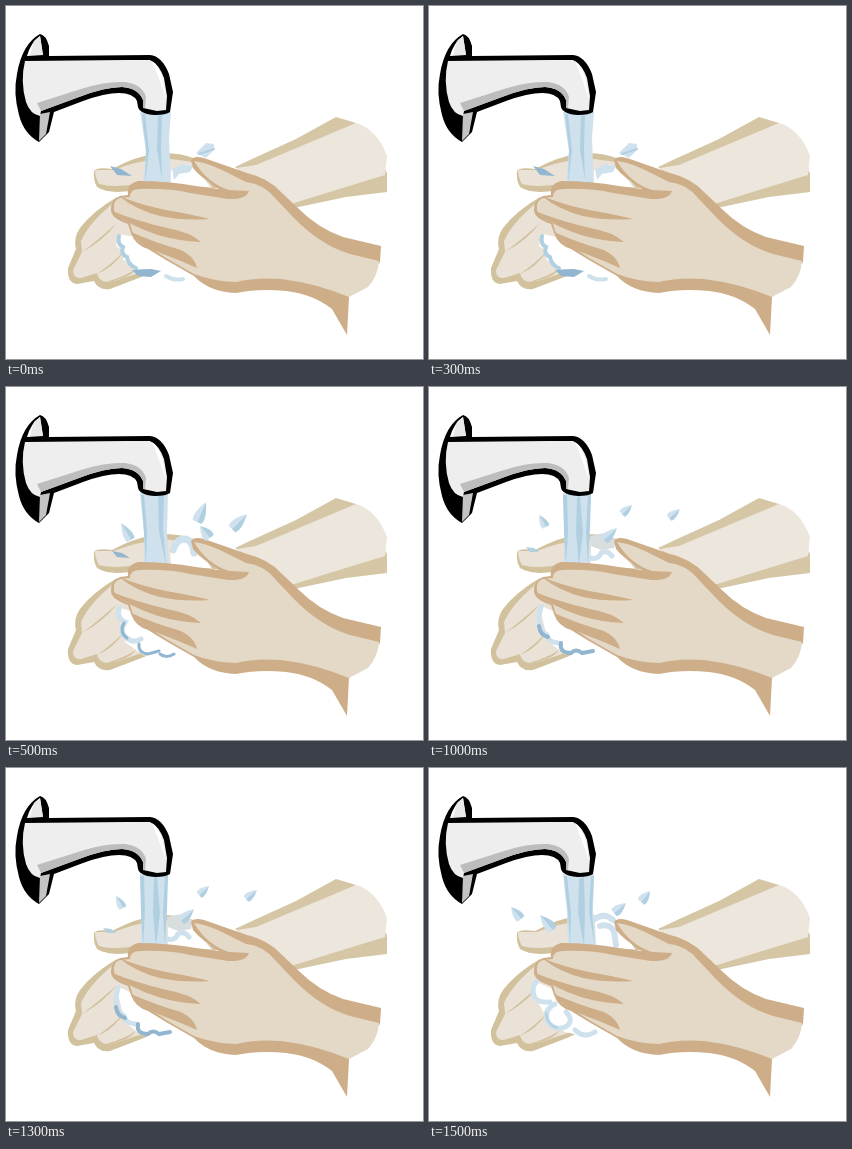
These frames come from a looping animation (417x353 px, 2000 ms). An HTML page:

```html
<!DOCTYPE html>
<html lang="en">
<head>
<meta charset="utf-8">
<title>Washing hands</title>
<style>
html, body { margin: 0; width: 100%; height: 100%; overflow: hidden; background: #fff; }
svg { display: block; width: 100vw; height: 100vh; }
</style>
</head>
<body>
<svg viewBox="0 0 417 353" xmlns="http://www.w3.org/2000/svg">
  <g id="backHand">
    <path fill="#d5c7a5" d="M229 161L246 153L290 133L330 111L350 117L381 167L381 186L340 191L288 202L270 190Z"/>
    <path fill="#ede6dc" d="M231 162L250 159L300 138L350 117Q371 123 381 150L379 169L330 184L285 198L262 181L238 167Z"/>
    <path fill="#d2c19d" d="M88 165Q90 161 106 163Q130 150 153 147Q174 146 190 153L215 182L128 184Q104 189 91 181Q87 174 88 165Z"/>
    <path fill="#ebe2d7" d="M89 164L108 164Q130 155 158 152L187 156L207 182L130 178Q107 182 93 178Q89 171 89 164Z"/>
    <path fill="#d2c19d" d="M111 191Q87 205 74 222Q67 232 70 243L62 262Q61 277 71 278L88 275Q93 285 104 283L138 270L151 264L130 219Z"/>
    <path fill="#ebe2d7" d="M110 195Q84 215 75 235L76 246L67 264Q67 273 75 272L91 267Q92 274 100 276L112 274L145 263L124 220Z"/>
    <path fill="#d2c19d" d="M76 246Q91 235 111 217Q97 235 76 246ZM91 268Q107 257 118 245Q108 261 91 268ZM100 276Q118 271 130 263Q123 273 100 276Z"/>
  </g>
  <g id="water"></g>
  <g id="frontHand">
    <path fill="#cdae88" d="M185 154Q188 149 198 152L241 167Q262 172 275 186L294 204Q312 222 337 231L375 240L374 256L343 291L341 329L326 303Q307 288 280 285Q253 282 230 287Q203 286 188 270L160 254L142 243Q129 239 125 227L122 218Q104 212 105 203Q105 194 114 190L122 189Q120 178 132 175Q161 175 190 180L213 183Q194 171 187 162Z"/>
    <path fill="#e4d9c7" d="M188 155Q199 156 216 164L240 176Q258 178 269 192L287 211Q314 239 344 248L373 255Q372 270 362 281L343 291Q309 277 275 273Q249 271 230 276Q206 275 188 268L160 252L142 240Q131 236 126 225L124 217Q107 208 108 203Q107 194 114 192L124 191Q124 183 134 183Q162 182 184 187L222 193Q240 194 243 185L223 184Q201 177 188 155Z"/>
    <path fill="#cdae88" d="M113 190Q135 199 160 204Q184 208 204 213Q177 215 154 210Q130 204 113 190ZM106 205Q131 215 161 222Q184 226 195 236Q172 235 152 229Q124 220 106 205ZM125 226Q150 237 172 243Q188 249 191 262Q173 254 157 248Q135 240 125 226Z"/>
  </g>
  <g id="drops"></g>
  <g id="tap">
    <path d="M34 28Q40 29 43 40L43 50L144 49Q156 50 163 68L167 86L164 106Q160 109 149 109Q134 108 132 101L131 95Q127 87 113 87Q99 87 77 95L48 106L43 126L33 136Q18 128 13 109Q7 87 11 68Q16 38 34 28Z"/>
    <path fill="#fff" d="M34 30L37 49L21 50Q25 36 34 30Z"/>
    <path fill="#e9e9e9" d="M28 35L34 30L37 49L24 49Z"/>
    <path fill="#eee" d="M19 55L120 54L144 54Q153 58 158 72L161 90L160 104L151 105L137 102L137 94Q132 82 116 81Q99 81 73 91L35 105L34 110Q24 108 20 96Q14 75 19 55Z"/>
    <path fill="#bdbdbd" d="M31 97L75 83Q99 75 119 76Q136 78 140 91L139 102L137 102L137 94Q132 82 116 81Q99 81 73 91L35 105Z"/>
    <path fill="#c4c4c4" d="M34 108L44 106L40 128L33 135Z"/>
    <path fill="#fff" d="M146 55Q154 61 157 75L160 93Q154 74 146 55Z"/>
  </g>
</svg>
<script>
const HOLD = 500;
const PALE = "#cfe1ed", MID = "#b0d0e2", DEEP = "#92b6cf";
const water = document.getElementById("water");
const drops = document.getElementById("drops");

const fill = (d, color) => `<path d="${d}" fill="${color}"/>`;
const line = (d, color, width) =>
  `<path d="${d}" fill="none" stroke="${color}" stroke-width="${width}" stroke-linecap="round"/>`;

// A bead pointing from its tip (x, y) to its blunt end (u, v).
function drop([x, y, u, v, w]) {
  const len = Math.hypot(u - x, v - y);
  const nx = (y - v) / len * w, ny = (u - x) / len * w;
  const mx = x + (u - x) * .7, my = y + (v - y) * .7;
  const half = side =>
    `M${x} ${y}Q${mx + nx * side} ${my + ny * side} ${u + nx * side * .6} ${v + ny * side * .6}L${u} ${v}Z`;
  return fill(half(1), PALE) + fill(half(-1), MID);
}

const poses = [
  {
    stream: "M134 106L165 106L163 132L165 181L137 181L140 145Z",
    streaks: fill("M136 108L139 108L143 145L139 178L140 143ZM152 110L156 109L155 144L156 174L151 143Z", MID),
    foam: fill("M165 164L174 164L180 158L192 164L204 181L164 181Z", "#fff") +
      fill("M166 163L177 158L187 160L184 166L173 168L168 174Z", PALE) +
      fill("M112 228L129 231L161 257L151 268L132 267L117 253L119 246L110 240Z", "#fff") +
      line("M113 230Q111 238 117 241Q114 248 121 251Q122 259 130 262", MID, 4) +
      fill("M126 264Q138 263 145 263L155 265L145 271L132 270Z", DEEP) +
      line("M160 270Q168 275 177 273", PALE, 4),
    splash: fill("M190 147L200 137L208 138L208 144L200 152Z", PALE) +
      line("M193 148L208 143", MID, 2) + fill("M104 160L115 163L126 170L111 169Z", DEEP),
    beads: []
  },
  {
    stream: "M134 106L162 106L161 145L163 181L138 181L138 145Z",
    streaks: fill("M135 108L138 108L141 144L140 179L138 146ZM152 108L158 108L157 141L160 179L153 144Z", MID),
    foam: fill("M164 159L176 153L191 159L205 181L165 181Z", "#fff") +
      line("M167 163Q172 149 182 153Q187 156 188 166", PALE, 7) +
      fill("M111 220L128 225L169 261L162 272L137 268L119 255Z", "#fff") +
      line("M113 221Q111 232 119 235Q113 244 119 250Q127 257 135 252", PALE, 5) +
      line("M118 236Q113 245 121 251M133 257Q132 266 142 267L153 264M154 267Q160 272 168 267", DEEP, 3),
    splash: fill("M106 164L116 166L124 171L111 170Z", DEEP),
    beads: [[115, 136, 125, 153, 7], [200, 115, 191, 135, 8], [241, 127, 226, 142, 8], [194, 139, 204, 151, 8]]
  },
  {
    stream: "M134 106L162 106L160 141L161 181L134 181L136 143Z",
    streaks: fill("M134 108L138 108L139 143L137 179L135 145ZM148 110L151 109L154 145L150 178L147 145ZM159 108L162 108L161 141L159 179L157 145Z", MID),
    foam: fill("M162 158L185 157L205 181L162 181Z", "#fff") +
      fill("M161 149L175 146L187 153L185 161L172 163L162 159Z", "#d8dddd") +
      line("M162 171Q169 173 172 166Q178 162 183 169", PALE, 5) +
      fill("M110 218L126 225L165 262L151 270L135 267L119 254Z", "#fff") +
      line("M112 220Q106 240 118 248Q119 255 129 256", PALE, 5) +
      line("M110 239Q111 248 119 250M132 256Q130 266 142 266Q147 261 153 266L164 264", DEEP, 4),
    splash: fill("M97 160L105 161L110 165L101 165Z", MID),
    beads: [[110, 128, 117, 140, 6], [203, 118, 193, 127, 6], [251, 122, 240, 131, 6], [188, 141, 175, 153, 7]]
  },
  {
    stream: "M134 106L165 106L164 142L167 181L139 181L138 144Z",
    streaks: fill("M135 108L138 108L142 145L141 179L139 145ZM150 111L155 109L156 145L155 178L149 145ZM162 108L165 108L163 145L166 179L160 144Z", MID),
    foam: fill("M166 151L185 151L206 181L167 181Z", "#fff") +
      line("M166 151Q175 144 184 152M171 158Q180 155 185 163L187 177", PALE, 6) +
      fill("M105 213L126 222L169 261L158 269L136 264L119 253L107 230Z", "#fff") +
      line("M108 213Q101 220 106 230Q110 235 121 234", PALE, 5) +
      line("M126 236Q114 242 119 254Q127 264 138 258Q145 252 137 244M146 262Q155 271 166 264", PALE, 5) +
      line("M117 245Q118 257 128 260", MID, 2),
    splash: "",
    beads: [[82, 139, 92, 151, 7], [111, 147, 124, 162, 8], [197, 135, 185, 145, 7], [221, 123, 212, 134, 7]]
  }
];

let shown = -1;
function draw(time) {
  const i = Math.floor(time / HOLD) % poses.length;
  if (i === shown) return;
  shown = i;
  const p = poses[i];
  water.innerHTML = p.foam + fill(p.stream, PALE) + p.streaks;
  drops.innerHTML = p.splash + p.beads.map(drop).join("");
}

const start = performance.now();
function tick() {
  draw(performance.now() - start);
  requestAnimationFrame(tick);
}
tick();
</script>
</body>
</html>
```
